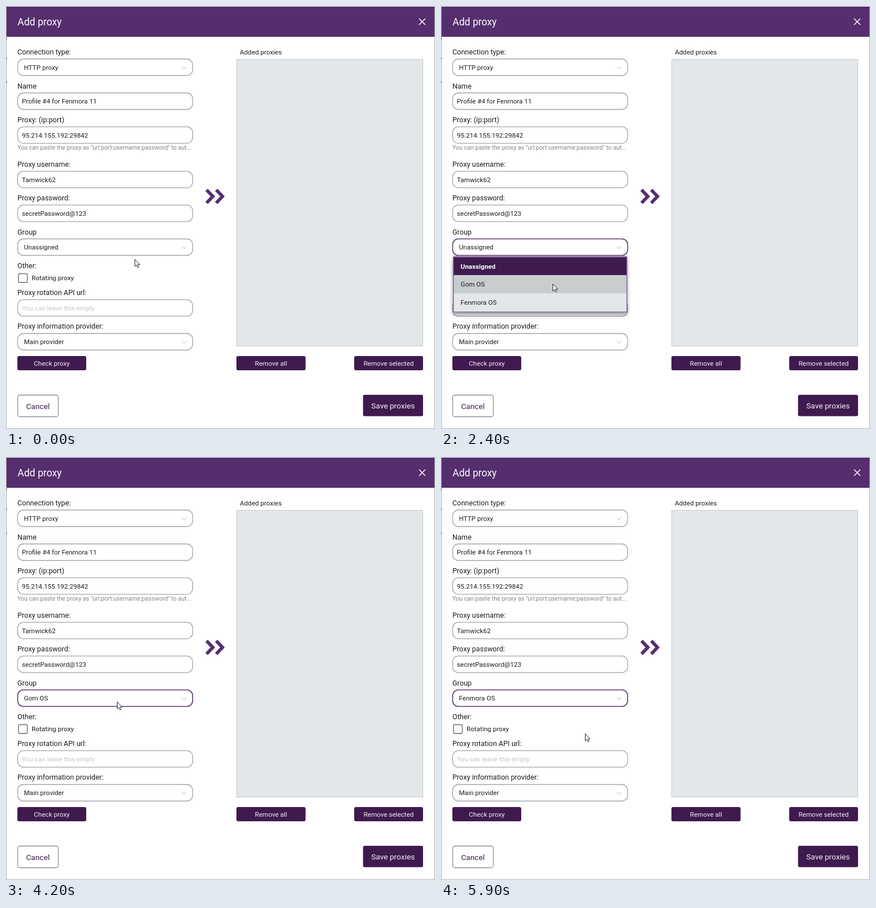
These frames come from a looping animation (754 px wide and 742 px high, 6000 ms). An HTML page with a canvas:

```html
<!DOCTYPE html>
<html lang="en">
<head>
<meta charset="utf-8">
<title>Add proxy</title>
<style>
  html, body { margin: 0; width: 100%; height: 100%; overflow: hidden; background: #fff; }
  canvas { display: block; }
</style>
</head>
<body>
<canvas id="stage" width="754" height="742"></canvas>
<script>
const ctx = document.getElementById('stage').getContext('2d');
const LOOP = 6000, STEP = 100;
const PURPLE = '#562e6e', DARK = '#3f1a4f', INK = '#1d1d1f', PANEL = '#e3e7ea';
const GROUPS = ['Unassigned', 'Gom OS', 'Fenmora OS'];
const INPUT = 11.6, LABEL = 12.6;

// Pointer tip: time, x, y
const PATH = [
  [0, 226, 444], [300, 198, 430], [800, 197, 430], [1300, 196, 487], [2400, 196, 487],
  [2800, 196, 490], [3500, 196, 490], [4000, 195, 429], [4500, 195, 429],
  [5000, 184, 510], [5400, 184, 514], [5900, 253, 485]
];

function text(str, x, y, size, color = INK, align = 'left', weight = 400) {
  ctx.font = `${weight} ${size}px Roboto, sans-serif`;
  ctx.fillStyle = color;
  ctx.textAlign = align;
  ctx.fillText(str, x, y);
}

function box(x, y, w, h, radius, fill, stroke, width = 1) {
  ctx.beginPath();
  ctx.roundRect(x, y, w, h, radius);
  if (fill) { ctx.fillStyle = fill; ctx.fill(); }
  if (stroke) { ctx.strokeStyle = stroke; ctx.lineWidth = width; ctx.stroke(); }
}

function line(points, color, width) {
  ctx.beginPath();
  points.forEach(([x, y]) => ctx.lineTo(x, y));
  ctx.strokeStyle = color;
  ctx.lineWidth = width;
  ctx.stroke();
}

function field(mid, value, color = INK) {
  box(20.5, mid - 14.5, 307.5, 29, 10, '#fff', '#a5a2aa', 1.3);
  text(value, 28, mid + 4.2, INPUT, color);
}

function select(mid, value, focused) {
  box(20.5, mid - 14.5, 307.5, 29, 10, '#fff', focused ? '#573b6b' : '#a5a2aa', focused ? 1.6 : 1.3);
  text(value, 31.5, mid + 4.2, INPUT);
  line([[309.3, mid - 1.2], [313, mid + 2.8], [316.7, mid - 1.2]], '#b4b0b9', 1);
}

function button(x, y, w, h, label, size = INPUT) {
  box(x, y, w, h, 3, DARK);
  text(label, x + w / 2, y + h / 2 + size * 0.36, size, '#f4f0f6', 'center');
}

function windowFrame() {
  ctx.fillStyle = '#fff';
  ctx.fillRect(0, 0, 754, 742);
  ctx.fillStyle = '#b3b0b6';
  ctx.fillRect(0, 0, 1, 742);
  ctx.fillRect(753, 0, 1, 742);
  ctx.fillRect(0, 741, 754, 1);
  ctx.fillStyle = '#55505a';
  for (const y of [55, 90, 131]) ctx.fillRect(0, y, 1, 4);
  ctx.fillStyle = PURPLE;
  ctx.fillRect(1, 1, 752, 53);
  text('Add proxy', 20.3, 34, 17.45, '#fff');
  line([[726, 22], [737, 33]], '#fff', 1.5);
  line([[737, 22], [726, 33]], '#fff', 1.5);
}

function form(group, focused) {
  const labels = [
    ['Connection type:', 85], ['Name', 144.5], ['Proxy: (ip:port)', 203.5],
    ['Proxy username:', 281.5], ['Proxy password:', 341], ['Group', 400.5],
    ['Other:', 459.5], ['Proxy rotation API url:', 507], ['Proxy information provider:', 566]
  ];
  labels.forEach(([str, y]) => text(str, 20, y, LABEL));
  select(107.5, 'HTTP proxy');
  field(167, 'Profile #4 for Fenmora 11');
  field(226.3, '95.214.155.192:29842');
  text('You can paste the proxy as "url:port:username:password" to aut...', 20, 252, 10.6, '#85838a');
  field(304.3, 'Tamwick62');
  field(363.7, 'secretPassword@123');
  select(423, group, focused);
  box(22, 469.5, 15.5, 15.5, 2, '#fff', '#8c8a90', 1.8);
  text('Rotating proxy', 45, 481, INPUT);
  field(529.7, 'You can leave this empty', '#c6c6ca');
  select(589, 'Main provider');
  button(20, 614, 121, 25, 'Check proxy');
  box(20.5, 682.5, 71.5, 38, 4, '#fff', '#8f8c94', 1.3);
  text('Cancel', 56, 706.5, 13.7, DARK, 'center');
}

function proxyList() {
  text('Added proxies', 411, 85, INPUT);
  box(405.5, 93.5, 327, 503, 0, PANEL, '#c3cacc');
  button(405, 614, 121.5, 25, 'Remove all');
  button(612, 614, 121, 25, 'Remove selected');
  button(627.5, 682, 105.5, 37.5, 'Save proxies', 13.6);
  for (const x of [352.5, 369.5]) line([[x, 322.5], [x + 11, 334], [x, 345.5]], PURPLE, 5.8);
}

function dropdown(selected, hovered) {
  ctx.save();
  ctx.shadowColor = 'rgba(0,0,0,.42)';
  ctx.shadowBlur = 7;
  ctx.shadowOffsetY = 4;
  box(21, 439, 306, 98.5, 1, PANEL);
  ctx.restore();
  GROUPS.forEach((name, i) => {
    const y = 440.5 + i * 31.7, active = i === selected;
    ctx.fillStyle = active ? DARK : i === hovered ? '#c7cccd' : PANEL;
    ctx.fillRect(22, y, 304, 31.7);
    text(name, 34.5, y + 20, INPUT, active ? '#fff' : INK, 'left', active ? 700 : 400);
  });
  box(21.7, 439.5, 305, 97.3, 1, null, '#87639f', 1.5);
}

function pointer(t) {
  const next = Math.max(1, PATH.findIndex(p => p[0] >= t));
  const [t0, x0, y0] = PATH[next - 1], [t1, x1, y1] = PATH[next];
  const k = (t - t0) / (t1 - t0), ease = k * k * (3 - 2 * k);
  ctx.save();
  ctx.translate(x0 + (x1 - x0) * ease + 0.5, y0 + (y1 - y0) * ease + 0.5);
  ctx.beginPath();
  [[0, 0], [0, 12.4], [2.8, 9.8], [4.7, 14.2], [6.8, 13.3], [4.9, 9.1], [8.7, 9.1]]
    .forEach(([x, y]) => ctx.lineTo(x, y));
  ctx.closePath();
  ctx.fillStyle = '#fff';
  ctx.fill();
  ctx.strokeStyle = '#27272b';
  ctx.lineWidth = 1;
  ctx.stroke();
  ctx.restore();
}

function draw(t) {
  const selected = t < 2800 ? 0 : t < 5500 ? 1 : 2;
  const firstOpen = t >= 400 && t < 2800;
  const secondOpen = t >= 4600 && t < 5500;
  windowFrame();
  form(GROUPS[selected], t >= 400);
  proxyList();
  if (firstOpen) dropdown(0, t >= 500 ? 1 : -1);
  if (secondOpen) dropdown(1, t >= 5100 ? 2 : -1);
  pointer(t);
}

function tick() {
  draw(Math.floor((performance.now() % LOOP) / STEP) * STEP);
  requestAnimationFrame(tick);
}
tick();
</script>
</body>
</html>
```
